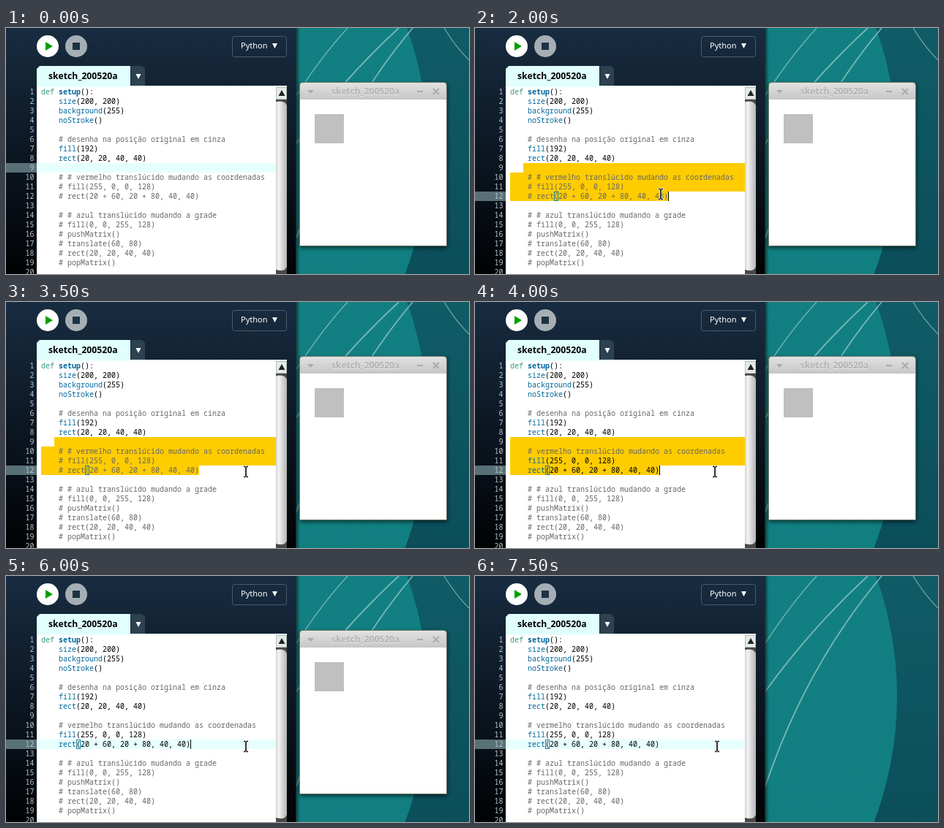
Recreate the animation shown at these times as an HTML page. Size 633x337 px, loop 8000 ms.

```html
<!DOCTYPE html>
<html lang="pt">
<head>
<meta charset="utf-8">
<title>Sketch</title>
<style>
html, body { margin: 0; width: 100%; height: 100%; overflow: hidden; background: #0e5660; }
svg { display: block; }
text { white-space: pre; font: 12px "Noto Sans", "Open Sans", sans-serif; }
.bold { font-weight: bold; }
#code text, #nums text { font: 10px "Noto Sans Mono", "DejaVu Sans Mono", monospace; }
#nums { fill: #b6c6cc; text-anchor: end; }
.def { fill: #33997e; }
.fn { fill: #006699; }
#code .name { fill: #006699; font-weight: bold; }
.note { fill: #666; }
</style>
</head>
<body>
<svg width="633" height="337" viewBox="0 0 633 337">
  <defs>
    <linearGradient id="night" x2="0" y2="1"><stop stop-color="#182c41"/><stop offset="1" stop-color="#010204"/></linearGradient>
    <linearGradient id="deep" x2="0" y2="1"><stop stop-color="#0f5c66"/><stop offset="1" stop-color="#0b4e5a"/></linearGradient>
    <linearGradient id="teal" x2="0" y2="1"><stop stop-color="#128083"/><stop offset="1" stop-color="#117f80"/></linearGradient>
    <linearGradient id="bar" x2="0" y2="1"><stop stop-color="#e2e2e2"/><stop offset="1" stop-color="#c6c6c6"/></linearGradient>
    <linearGradient id="thumb"><stop stop-color="#d2d2d2"/><stop offset=".25" stop-color="#f4f4f4"/><stop offset="1" stop-color="#b4b4b4"/></linearGradient>
    <linearGradient id="edge"><stop stop-color="#000" stop-opacity=".45"/><stop offset="1" stop-color="#000" stop-opacity="0"/></linearGradient>
    <filter id="blur"><feGaussianBlur stdDeviation="2.5"/></filter>
  </defs>

  <!-- wallpaper -->
  <rect x="396" width="237" height="337" fill="url(#deep)"/>
  <circle cx="92" cy="165" r="485" fill="url(#teal)"/>
  <g fill="none" stroke="#cfe6e4" stroke-opacity=".55">
    <path d="M467 0Q432 38 397 92" stroke-width="1.2"/>
    <path d="M537 0Q459 72 397 158" stroke-width="1.8"/>
    <path d="M556 0Q452 124 397 288" stroke-width="1.8"/>
    <path d="M599 0Q614 25 633 44" stroke-width="1.2"/>
  </g>
  <rect x="397" width="5" height="337" fill="url(#edge)"/>

  <!-- editor frame -->
  <rect width="396" height="337" fill="url(#night)"/>
  <rect x="396" width="1" height="337" fill="#20282c"/>
  <circle cx="57" cy="25" r="15" fill="#fff"/>
  <path d="M54 19L64 25L54 31Z" fill="#00a000"/>
  <circle cx="96" cy="25" r="15" fill="#a6aeb5"/>
  <rect x="91" y="20" width="10" height="10" fill="#1d3243"/>
  <rect x="309.500" y="11.500" width="74" height="28" rx="3" fill="none" stroke="#4b5c6b"/>
  <text x="321" y="28" fill="#fff" style="font-size:11px">Python</text>
  <path d="M364 21H371L367.500 28Z" fill="#fff"/>
  <path d="M42 79V56L46 52H170V79Z" fill="#e0fffd"/>
  <path d="M171 79V52H186L190 56V79Z" fill="#2d4250"/>
  <path d="M177.500 63H184.500L181 70Z" fill="#fff"/>
  <text class="bold" x="58" y="70" style="font-size:12.2px">sketch_200520a</text>
  <rect x="42" y="79" width="342" height="258" fill="#fff"/>
  <rect x="42" y="79" width="342" height="2" fill="#e9fffd"/>

  <!-- scroll bar -->
  <rect x="369" y="81" width="15" height="256" fill="url(#thumb)"/>
  <rect x="369.500" y="81.500" width="14" height="16" fill="#e3ebe9" stroke="#b5bebc"/>
  <path d="M372.500 93H381.500L377 85Z" fill="#222"/>
  <path d="M369 98H384V106Q381 99 369 101Z" fill="#484848"/>
  <path d="M369 331Q381 335 384 327V337H369Z" fill="#484848"/>

  <g id="rows"></g>
  <g id="nums"></g>
  <g id="code"></g>
  <rect id="paren" y="224.500" width="5" height="12" fill="none" stroke="#0a7fa8"/>
  <rect id="caret" y="224" width="1" height="13"/>

  <!-- running sketch -->
  <g id="win">
    <rect x="401" y="76" width="203" height="226" rx="4" opacity=".5" filter="url(#blur)"/>
    <path d="M401 299V79Q401 74 406 74H598Q603 74 603 79V299Z" fill="#6f7f6c"/>
    <path d="M402 98V79Q402 75 406 75H598Q602 75 602 79V98Z" fill="url(#bar)"/>
    <rect x="402" y="98" width="200" height="200" fill="#fff"/>
    <path d="M412 85H421L416.500 90Z" fill="#aaa"/>
    <path d="M562 87H570M584 83L592 91M592 83L584 91" stroke="#aaa" stroke-width="2"/>
    <text class="bold" x="445" y="92" fill="#f2f2f2">sketch_200520a</text>
    <text class="bold" x="445" y="91" fill="#b2b2b2">sketch_200520a</text>
    <rect x="422" y="118" width="40" height="40" fill="#c0c0c0"/>
  </g>

  <g id="mouse" fill="none">
    <path d="M.5 1.500H7.500M4 1.500V15.500M.5 15.500H7.500" stroke="#fff" stroke-width="3.200"/>
    <path d="M1 1.500H3.500M4.500 1.500H7M4 2V15M1 15.500H3.500M4.500 15.500H7" stroke="#000" stroke-width="1.600"/>
  </g>
</svg>
<script>
const STEP = 500, LOOP = 8000, ROW = 13;
const $ = id => document.getElementById(id);
const rowTop = n => 81 + (n - 1) * ROW;
const show = (el, on) => el.setAttribute("visibility", on ? "visible" : "hidden");

const grayNote = "desenha na posição original em cinza";
const head = `def setup():
    size(200, 200)
    background(255)
    noStroke()

    # ${grayNote}
    fill(192)
    rect(20, 20, 40, 40)

`;
const red = `    # vermelho translúcido mudando as coordenadas
    fill(255, 0, 0, 128)
    rect(20 + 60, 20 + 80, 40, 40)
`;
const tail = `
    # # azul translúcido mudando a grade
    # fill(0, 0, 255, 128)
    # pushMatrix()
    # translate(60, 80)
    # rect(20, 20, 40, 40)
    # popMatrix()`;
const listing = open => head + (open ? red : red.replace(/^    /gm, "    # ")) + tail;

const span = (cls, s) => `<tspan class="${cls}">${s}</tspan>`;
const paint = line => /^\s*#/.test(line) ? span("note", line)
  : line.replace(/^def (\w+)/, (m, f) => span("def", "def") + " " + span("name", f))
        .replace(/^( +)(\w+)/, (m, gap, f) => gap + span("fn", f));
const typeset = code => code.split("\n").map((line, i) =>
  `<text x="48" y="${rowTop(i + 1) + 10}">${paint(line)}</text>`).join("");

const pages = [typeset(listing(false)), typeset(listing(true))];
$("nums").innerHTML = Array.from({ length: 20 }, (_, i) =>
  `<text x="38.500" y="${rowTop(i + 1) + 10}">${i + 1}</text>`).join("");

const band = (n, x, end, fill) =>
  `<rect x="${x}" y="${rowTop(n)}" width="${end - x}" height="${ROW}" fill="${fill}"/>`;

// first step, x, y
const mousePath = [[1, 160, 132], [2, 248, 216], [3, 271, 227], [4, 250, 219],
  [5, 250, 217], [6, 324, 224], [12, 324, 225], [13, 327, 225]];
const caretSteps = [4, 6, 8, 12, 14];

function render(k) {
  const open = k >= 8, selected = k >= 4 && k < 12;
  const line = k < 4 ? 9 : 12, end = open ? 252 : 264;
  const gold = "#ffcc00";
  $("rows").innerHTML = band(line, 0, 42, "#587076") + (selected
    ? band(9, open ? 48 : 66, 369, gold) + band(10, 48, 369, gold)
      + band(11, 48, 369, gold) + band(12, 48, end, gold)
    : band(line, 42, 369, "#e6fffd"));
  $("code").innerHTML = pages[+open];
  $("paren").setAttribute("x", open ? 96.5 : 108.5);
  show($("paren"), k >= 4);
  $("caret").setAttribute("x", end);
  show($("caret"), caretSteps.includes(k));
  show($("win"), k < 15);
  const spot = mousePath.filter(p => p[0] <= k).pop();
  show($("mouse"), spot);
  if (spot) $("mouse").setAttribute("transform", `translate(${spot[1]} ${spot[2]})`);
}

let last = -1;
const start = performance.now();
function tick() {
  const k = Math.floor((performance.now() - start) % LOOP / STEP);
  if (k !== last) render(last = k);
  requestAnimationFrame(tick);
}
tick();
</script>
</body>
</html>
```
